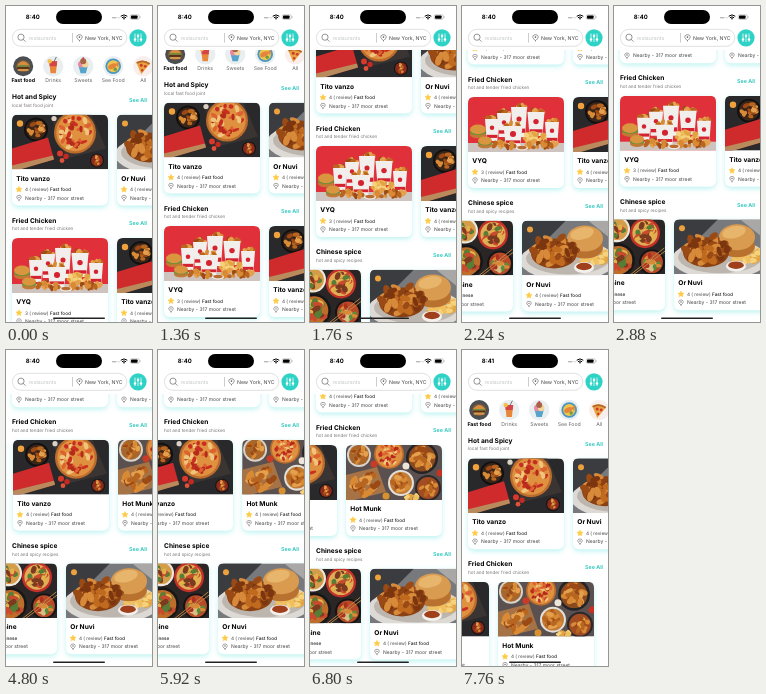
An HTML page that plays this animation: 146x316 px, repeating every 8 s.

```html
<!DOCTYPE html>
<html lang="en">
<head>
<meta charset="utf-8">
<title>Food delivery app</title>
<style>
  html, body { margin: 0; width: 100%; height: 100%; overflow: hidden; background: #fff; }
  svg { display: block; width: 100vw; height: 100vh; }
  text { font-family: Inter, Roboto, sans-serif; text-rendering: geometricPrecision; }
  .card { filter: drop-shadow(0 2px 2.8px #a5efecc0); }
</style>
</head>
<body>
<svg id="stage" viewBox="0 0 146 316" xmlns="http://www.w3.org/2000/svg"></svg>
<script>
const TEAL = '#2fd3c6';
const LOOP = 8000, STEP = 80;

let seed = 7;
const rnd = () => (seed = (seed * 16807) % 2147483647) / 2147483647;

const text = (x, y, str, size, fill = '#000', weight = 400, extra = '') =>
  `<text x="${x}" y="${y}" font-size="${size}" fill="${fill}" font-weight="${weight}" ${extra}>${str}</text>`;
const rect = (x, y, w, h, fill, r = 0, extra = '') =>
  `<rect x="${x}" y="${y}" width="${w}" height="${h}" fill="${fill}" rx="${r}" ${extra}/>`;
const oval = (x, y, rx, fill, ry = rx, turn = 0) =>
  `<ellipse cx="${x}" cy="${y}" rx="${rx}" ry="${ry}" fill="${fill}" transform="rotate(${turn} ${x} ${y})"/>`;
const path = (d, fill = 'none', stroke = 'none', width = .7) =>
  `<path d="${d}" fill="${fill}" stroke="${stroke}" stroke-width="${width}" stroke-linecap="round" stroke-linejoin="round"/>`;
const move = (x, y, body, id = '') => `<g id="${id}" transform="translate(${x} ${y})">${body}</g>`;

// Scatter of small ovals inside a larger one.
function pile(x, y, rx, ry, count, size, colors) {
  let out = '';
  for (let i = 0; i < count; i++) {
    const a = rnd() * 6.283, d = Math.sqrt(rnd());
    out += oval(x + Math.cos(a) * d * rx, y + Math.sin(a) * d * ry, size * (.8 + rnd() * .5),
      colors[i % colors.length], size * (.5 + rnd() * .3), rnd() * 180);
  }
  return out;
}

const CRISP = ['#b8651f', '#d98a35', '#9c4a15', '#e5a04d'];
const GLAZED = ['#9a4a14', '#c06a20', '#7b3610', '#d78a3a'];
const FRIES = ['#f0c060', '#e2a443', '#f6d27c'];
const GREENS = ['#587d35', '#c94a2c', '#e2b34b', '#7c3a20'];
const bowl = (x, y, r, rim, fill, colors, n = 12) =>
  oval(x, y, r, rim) + oval(x, y, r * .84, fill) + pile(x, y, r * .62, r * .62, n, r * .24, colors);
const pizza = (x, y, r) => oval(x, y, r, '#bc6c2c') + oval(x, y, r * .89, '#df9140') +
  pile(x, y, r * .74, r * .74, 40, r * .14, ['#c92f20', '#f0c47a', '#b52a1b', '#dd6230']);
const tub = (x, y, w, h) => pile(x, y, w * .42, 2.5, 9, 2.8, CRISP) +
  path(`M${x - w / 2} ${y}h${w}l${-w * .12} ${h}h${-w * .76}z`, '#f2eeeb') +
  rect(x - w * .38, y + h * .72, w * .76, h * .14, '#d42330') +
  oval(x, y + h * .4, w * .16, '#d42330');
const burger = (x, y, r) => oval(x, y + r * .45, r, '#c07a34', r * .45) +
  oval(x, y + r * .15, r * 1.05, '#6d8f3c', r * .35) + oval(x, y - r * .2, r, '#d9963f', r * .6);

const photos = {
  pizza: rect(0, 0, 96, 55, '#29282a') +
    path('M40 4L78 -3L94 34L54 44Z', '#3a3433') + pizza(63, 18, 21) +
    bowl(24, 15, 12, '#111', '#3b2418', CRISP, 16) +
    oval(8, 9, 3.2, '#f0a13b') + oval(42, 4, 2.6, '#d9d1c4') +
    path('M0 34L36 23L42 45L6 55H0Z', '#cf2b2c') + path('M0 51L41 41L42 45L8 55H0Z', '#b98a5c') +
    oval(48, 39, 3, '#d8372b') + oval(54, 42, 2.7, '#c42a21') + oval(50, 46, 2.4, '#e0513a') +
    bowl(85, 46, 7, '#151515', '#8c2a1d', CRISP, 8),
  buckets: rect(0, 0, 96, 55, '#e0303a') + rect(0, 46, 96, 9, '#cfc3c0') +
    tub(36, 16, 14, 24) + tub(68, 15, 17, 24) + tub(51, 10, 16, 30) + tub(84, 25, 14, 22) +
    tub(24, 22, 14, 22) + tub(45, 29, 19, 20) +
    burger(10, 34, 8) + burger(17, 45, 7) +
    pile(66, 41, 12, 5, 26, 3, FRIES) + pile(35, 48, 13, 3.5, 18, 3, CRISP) + pile(73, 48, 16, 4, 22, 3, CRISP) +
    oval(54, 51, 6, '#eee9e2', 2.6) + oval(54, 50.5, 4.6, '#b86b2e', 1.8),
  chicken: rect(0, 0, 96, 55, '#77797c') + path('M0 0H44L20 24L0 36Z', '#3a3c40') +
    path('M66 0H96V24Z', '#a9a8a7') + oval(46, 40, 48, '#dddad6', 20) + oval(46, 38, 42, '#bcb6af', 16) +
    pile(74, 38, 15, 8, 28, 4, FRIES) +
    oval(63, 27, 18, '#b8712f', 11) + oval(63, 18, 18, '#d99b50', 13) + oval(60, 13, 12, '#e8b56d', 6, -12) +
    oval(32, 33, 23, '#8a4114', 15) + pile(32, 30, 21, 14, 52, 4.6, GLAZED) +
    oval(8, 9, 3, '#eda13c') +
    oval(62, 47, 10, '#f4f1ec', 5.5) + oval(62, 46, 7.8, '#9f3f1c', 3.7),
  feast: rect(0, 0, 96, 55, '#5a5050') +
    bowl(13, 10, 12, '#d8d3cb', '#a5672d', CRISP, 16) + pizza(43, 9, 15) +
    bowl(76, 13, 16, '#242326', '#8a4a20', CRISP, 24) +
    path('M0 30L31 22L40 47L8 55H0Z', '#a67347') + pile(20, 39, 14, 11, 34, 3.6, CRISP) +
    bowl(55, 38, 13, '#e3dfd9', '#c17b34', CRISP, 18) + bowl(82, 43, 13, '#2a282a', '#a14c23', CRISP, 18) +
    oval(60, 21, 3.5, '#ece6da') + oval(28, 19, 3.5, '#c83b27') +
    oval(40, 51, 3.5, '#d8912e') + oval(94, 28, 3.5, '#c43222') + pile(66, 52, 6, 3, 10, 2.4, FRIES),
  wok: rect(0, 0, 96, 55, '#2a2626') +
    bowl(17, 17, 16, '#171718', '#a33a23', GREENS, 22) + bowl(48, 10, 13, '#eee8df', '#d39d4a', GREENS) +
    bowl(76, 14, 15, '#c33027', '#e0ac56', GREENS, 24) + bowl(49, 41, 17, '#171718', '#be6d2b', GREENS, 26) +
    bowl(83, 43, 13, '#151517', '#b94a28', ['#db8b35', '#5b8b3b', '#d8bd84', '#aa3120'], 20) +
    bowl(17, 47, 12, '#dedad3', '#d4b169', GREENS) + path('M62 55L95 29M65 55L96 32', 'none', '#c48a47', .9)
};

const pin = (x, y, s, color) => move(x, y,
  path(`M0 ${s}C${-s * 1.6} ${-s * .3} ${-s * .8} ${-s} 0 ${-s}S${s * 1.6} ${-s * .3} 0 ${s}Z`, 'none', color, .6) +
  oval(0, -s * .2, s * .27, color));
const star = (x, y) => {
  const pts = Array.from({ length: 10 }, (_, i) => {
    const a = i * Math.PI / 5 - Math.PI / 2, r = i % 2 ? 1.6 : 3.2;
    return `${x + Math.cos(a) * r},${y + Math.sin(a) * r}`;
  });
  return `<polygon points="${pts.join(' ')}" fill="#fdcb45" stroke="#fdcb45" stroke-width=".5" stroke-linejoin="round"/>`;
};

const card = ([photo, name, stars = 4, kind = 'Fast food', place = '317 moor street'], i) =>
  move(6 + i * 105, 0,
    rect(0, 0, 96, 91, '#fff', 6, 'class="card"') +
    `<use href="#${photo}" clip-path="url(#top)"/>` +
    text(4.3, 66, name, 6.6, '#000', 700) +
    star(7, 75) + text(13, 76.8, `${stars} ( review)`, 4.7, '#444') +
    text(38, 76.8, kind, 4.7, '#222', 500) +
    pin(7, 83.3, 2.5, '#666') + text(13, 85.2, `Nearby - ${place}`, 5, '#444'));

const section = (i, title, sub, cards) => move(0, 108.5 + i * 123.5,
  text(6, -15.5, title, 6.6, '#000', 700) +
  text(6, -7.7, sub, 4.6, '#777') +
  text(123, -12.6, 'See All', 5.4, '#22c3bb', 600) +
  move(0, 0, cards.map(card).join(''), 'row' + i));

const icons = [
  oval(0, 0, 10, '#4c4f52') + oval(0, 0, 7, '#8a5a34', 6) + path('M-6 -1Q0 -9 6 -1Z', '#d38e43') +
    rect(-6, -1, 12, 1.6, '#71953f') + rect(-6, .6, 12, 2, '#5d3018') + rect(-5.5, 2.6, 11, 2.2, '#d19750', 1),
  path('M-4 -5H4L2.7 7H-2.7Z', '#e8863a') + path('M-4 -5H4L3.5 0H-3.5Z', '#d64545') +
    path('M1 -5L3 -9', 'none', '#555', .8) + oval(-3.5, -5, 2.2, '#f4bf4c'),
  path('M-4.5 0H4.5L2.7 7H-2.7Z', '#56a4cb') + oval(-2, -2, 3.2, '#e889a5') +
    oval(2, -2, 3.2, '#f2d59b') + oval(0, -5, 3, '#a56445') + oval(0, -8, 1, '#d63344'),
  oval(0, 0, 7.8, '#4797c4') + oval(0, 0, 6, '#f0c44d') + oval(-1, 0, 4.3, '#e5853b', 2.4, -25) +
    path('M2 -2L6 -5L5 1Z', '#e5853b') + oval(2, 3, 1.7, '#6d9c42'),
  path('M-7 -4Q0 -8 7 -3L-2 8Z', '#e9a343') + path('M-7 -4Q0 -8 7 -3L6 -1.5Q0 -6 -6 -2.5Z', '#b7682c') +
    oval(-2, -1, 1.5, '#cd3a28') + oval(2, 0, 1.4, '#cd3a28') + oval(-1, 4, 1.2, '#cd3a28')
];
const labels = ['Fast food', 'Drinks', 'Sweets', 'See Food', 'All'];
const categories = icons.map((icon, i) => move(17.2 + i * 30, 60.3,
  (i ? oval(0, 0, 10.2, i === 4 ? '#f8efec' : '#e9eef1') : '') + icon +
  text(0, 15.6, labels[i], 5.2, i ? '#666' : '#000', i ? 400 : 700, 'text-anchor="middle"'))).join('');

const header = rect(0, 0, 146, 44, '#fff') +
  text(19.8, 13.2, '8:40', 6, '#000', 700, 'id="clock"') + rect(50, 4, 46, 14, '#000', 7) +
  [107, 109, 111, 113].map(x => oval(x, 11.8, .55, x > 109 ? '#aaa' : '#222')).join('') +
  path('M115 10Q118 7.5 121 10M116.2 11.5Q118 10 119.8 11.5', 'none', '#000', 1) + oval(118, 12.8, .8, '#000') +
  rect(124.3, 8.8, 9, 4.6, 'none', 1.5, 'stroke="#999" stroke-width=".5"') +
  rect(125, 9.5, 6.6, 3.2, '#000', .8) + rect(133.8, 10.3, .6, 1.6, '#999') +
  rect(6.3, 23.3, 114.5, 17, '#fff', 8.5, 'stroke="#c9cccc" stroke-width=".6"') +
  `<circle cx="15" cy="31.2" r="3.1" fill="none" stroke="#666" stroke-width=".7"/>` +
  path('M17.3 33.5L19.2 35.4', 'none', '#666') +
  text(22.5, 33.6, 'restaurants', 5.2, '#c3c5c7') + rect(66.4, 27, .6, 9.5, '#aaa') +
  pin(73.5, 31.7, 3, '#555') + text(79, 33.6, 'New York, NYC', 5.2, '#444') +
  oval(132, 31.8, 8.6, TEAL) +
  [-3, 0, 3].map((dx, i) => path(`M${132 + dx} 28V35.6`, 'none', '#fff', .8) +
    oval(132 + dx, [33.5, 30, 33.5][i], 1.2, '#fff')).join('');

const stage = document.getElementById('stage');
stage.innerHTML = `<defs>
  <clipPath id="top"><path d="M0 55V6Q0 0 6 0H90Q96 0 96 6V55Z"/></clipPath>
  <clipPath id="frame"><rect width="96" height="55"/></clipPath>
  ${Object.entries(photos).map(([id, art]) => `<g id="${id}"><g clip-path="url(#frame)">${art}</g></g>`).join('')}
</defs>` + rect(0, 0, 146, 316, '#fff') +
  move(0, 0, categories +
    section(0, 'Hot and Spicy', 'local fast food joint', [['pizza', 'Tito vanzo'], ['chicken', 'Or Nuvi']]) +
    section(1, 'Fried Chicken', 'hot and tender fried chicken',
      [['buckets', 'VYQ', 3], ['pizza', 'Tito vanzo'], ['feast', 'Hot Munk']]) +
    section(2, 'Chinese spice', 'hot and spicy recipes',
      [['wok', 'Chinese cuisine', 4, 'Chinese', '7 moor street'], ['chicken', 'Or Nuvi']]), 'page') +
  header + rect(47, 311.4, 52, 1.6, '#222', .8);

// Scrolls: [start, from, to, duration scale]; a swipe speeds up, then glides to rest.
const vertical = [[1360, 12, 142.3, 410], [6800, 137, 137, 1], [7120, 137, 0, 260]];
const sideways = [[4400, 5, 105, 186], [5760, 105, 180, 240]];

function scrollAt(moves, t) {
  const swipe = moves.filter(([start]) => t >= start).pop();
  if (!swipe) return 0;
  const [start, from, to, scale] = swipe;
  return to + (from - to) * Math.exp(-(((t - start) / scale) ** 2));
}

const byId = id => document.getElementById(id);
const page = byId('page'), row = byId('row1'), clock = byId('clock');
byId('row2').setAttribute('transform', 'translate(-51 0)');

function draw(now) {
  const t = Math.floor((now % LOOP) / STEP) * STEP;
  page.setAttribute('transform', `translate(0 ${-scrollAt(vertical, t)})`);
  row.setAttribute('transform', `translate(${-scrollAt(sideways, t)} 0)`);
  clock.textContent = t < 7200 ? '8:40' : '8:41';
}

const begin = performance.now();
function tick() {
  draw(performance.now() - begin);
  requestAnimationFrame(tick);
}
tick();
</script>
</body>
</html>
```
